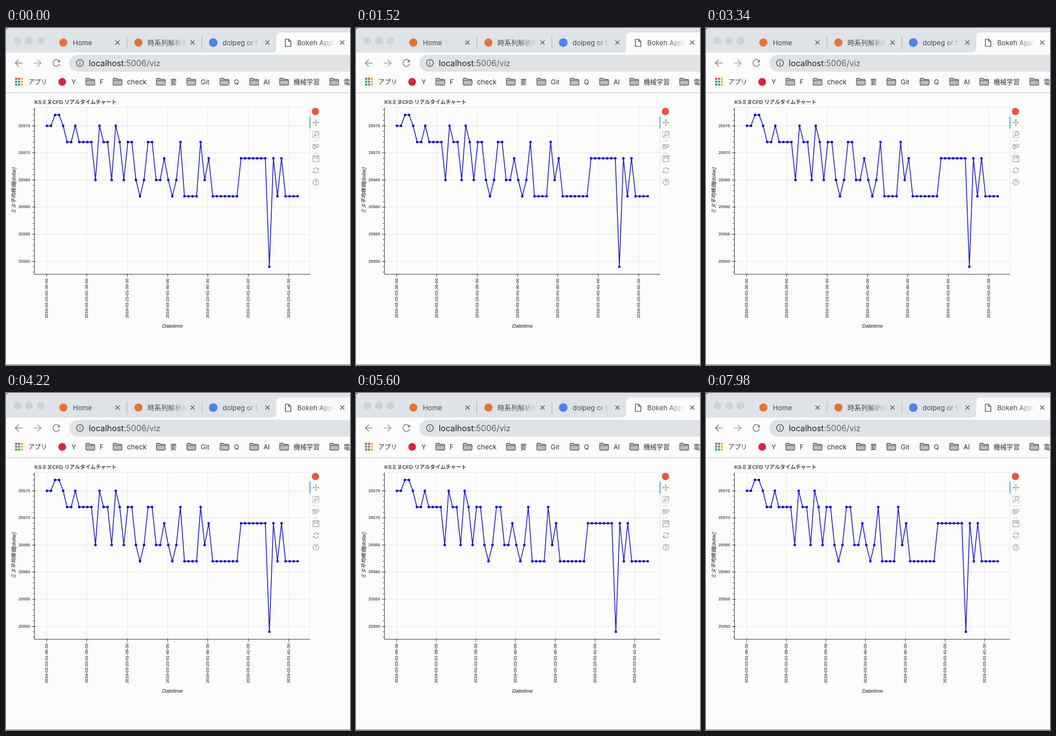
An HTML page for the animation above (8000 ms loop, 756x741 px).

```html
<!DOCTYPE html>
<html lang="ja">
<head>
<meta charset="utf-8">
<title>Live chart</title>
<style>
  html, body { margin: 0; height: 100%; overflow: hidden; background: #fcfcfc; }
  svg { display: block; width: 756px; height: 741px; }
  .ui { font: 15px Inter, "Noto Sans CJK JP", sans-serif; fill: #45494d; }
  .mark { font-size: 14.3px; fill: #2d3033; }
  .url { font-size: 18px; fill: #5f6368; }
  .plot { font: 9.2px "Liberation Sans", "Noto Sans CJK JP", sans-serif; fill: #333; }
  .plot text { stroke: #333; stroke-width: .15; }
  .plot .title { font-size: 11.5px; font-weight: bold; fill: #444; stroke: none; }
  .plot .axis { font-size: 11.4px; font-style: italic; }
  .line { fill: none; stroke: #1c1cdc; stroke-width: 1.8; stroke-linejoin: round; }
  .dot { fill: #0000f0; }
  .grid { stroke: #e4e4e8; fill: none; }
  .tick { stroke: #222; fill: none; }
  .icon { fill: none; stroke: #55595d; stroke-width: 1.7; }
  .tool { fill: none; stroke: #a1a6a9; stroke-width: 1.4; }
  .before { animation: hide 8s step-end infinite; }
  .after { animation: show 8s step-end infinite; }
  @keyframes hide { 0% { visibility: visible } 55%, 100% { visibility: hidden } }
  @keyframes show { 0% { visibility: hidden } 55%, 100% { visibility: visible } }
</style>
</head>
<body>
<svg id="stage" viewBox="0 0 756 741">
  <defs>
    <linearGradient id="fade2" gradientUnits="userSpaceOnUse" x1="355" x2="393"><stop stop-color="#45494d"/><stop offset="1" stop-color="#45494d" stop-opacity="0.15"/></linearGradient>
    <linearGradient id="fade3" gradientUnits="userSpaceOnUse" x1="525" x2="560"><stop stop-color="#45494d"/><stop offset="1" stop-color="#45494d" stop-opacity="0"/></linearGradient>
    <linearGradient id="fade4" gradientUnits="userSpaceOnUse" x1="685" x2="725"><stop stop-color="#45494d"/><stop offset="1" stop-color="#45494d" stop-opacity="0"/></linearGradient>
  </defs>

  <rect width="756" height="54" fill="#dee3e7"/>
  <path d="M0 0H5Q1 1 0 5Z" fill="#805a5c"/>
  <path d="M584 54Q594 54 594 44V20Q594 10 604 10H756V54Z" fill="#fcfcfc"/>
  <g fill="#d1d3d4" stroke="#c2c4c5">
    <circle cx="25" cy="28" r="7.5"/><circle cx="50.500" cy="28" r="7.5"/><circle cx="76" cy="28" r="7.5"/>
  </g>
  <path d="M265.500 19V46M430.500 19V46" stroke="#a3a7ab"/>
  <circle cx="126" cy="32" r="9" fill="#e8722e"/>
  <circle cx="291" cy="32" r="9" fill="#e8722e"/>
  <circle cx="455.500" cy="32" r="9.500" fill="#4a85ec"/>
  <path class="icon" d="M614 24.500H621L626 29.500V40.500H614ZM621 24.500V29.500H626"/>
  <g class="ui">
    <text x="147" y="37.500">Home</text>
    <text x="311" y="37.500" fill="url(#fade2)">時系列解析6</text>
    <text x="476" y="37.500" fill="url(#fade3)">dolpeg or t</text>
    <text x="640" y="37.500" fill="url(#fade4)">Bokeh Appl</text>
  </g>

  <g class="icon" stroke-width="2">
    <path d="M36.500 77H21M28 69.500L20.500 77L28 84.500" stroke="#7b7f83"/>
    <path d="M61 77H76.500M69.500 69.500L77 77L69.500 84.500" stroke="#9a9da0"/>
    <path d="M116.500 72A7.500 7.500 0 1 0 118 79" stroke="#7b7f83"/>
    <path d="M118.500 69V75.500H112Z" fill="#7b7f83" stroke="none"/>
  </g>
  <rect x="139" y="59" width="640" height="37" rx="18.500" fill="#dfe3e6"/>
  <circle class="icon" cx="162.500" cy="77" r="7.500"/>
  <path class="icon" d="M162.500 76V81.500M162.500 72.500V74.300"/>
  <g class="ui"><text class="url" x="182" y="83.500"><tspan fill="#202326">localhost</tspan>:5006/viz</text></g>

  <circle cx="123.500" cy="118.500" r="8.500" fill="#df2040"/>
  <path d="M0 142.500H756" stroke="#b4b4b6"/>
  <path d="M0 740.500H756" stroke="#6c6c6c"/>
  <g id="chrome"></g>
  <g id="chart" class="plot"></g>

  <circle cx="680" cy="183.500" r="8" fill="#e8573c"/>
  <path d="M668 195V221" stroke="#26a5d8" stroke-width="1.800"/>
  <g class="tool">
    <path d="M674.500 208H687.500M681 201.500V214.500M676.500 206L674.500 208L676.500 210M685.500 206L687.500 208L685.500 210M679 203.500L681 201.500L683 203.500M679 212.500L681 214.500L683 212.500"/>
    <path d="M674 227H688V241H674Z" stroke-dasharray="1.5 1.5"/>
    <circle cx="683" cy="232" r="4"/><path d="M680 235L676 239" stroke-width="2"/>
    <path d="M675 248H685M675 275H685" stroke="#c4c4c4" stroke-width="1"/>
    <rect x="674.500" y="256" width="5" height="9.500" rx="2.500"/><path d="M677 256V260"/>
    <circle cx="684.500" cy="259" r="3"/><path d="M683 262L681 265.500"/>
    <path d="M674.500 281H687.500V294H674.500ZM678 281V286H685V281M682.500 281V284"/>
    <path d="M675.500 312A5.600 5.600 0 0 1 685.500 309.500M686.500 314A5.600 5.600 0 0 1 676.500 316.500"/>
    <path d="M687.500 307V311.500H683ZM674.500 319V314.500H679Z" fill="#a1a6a9" stroke="none"/>
    <circle cx="681" cy="339" r="6.500"/>
    <path d="M679 337.500Q679 335.500 681 335.500T683 337.500Q683 338.700 681 339.800V340.700M681 341.700V343"/>
  </g>
</svg>
<script>
  const el = id => document.getElementById(id);
  const range = (n, f) => Array.from({ length: n }, (_, i) => f(i)).join('');
  const path = (cls, d) => `<path class="${cls}" d="${d}"/>`;

  // Browser buttons and bookmarks
  const close = x => path('icon', `M${x - 4.5} 27.5l9 9m0 -9l-9 9`);
  const folder = ([x, name]) =>
    `<path d="M${x + .5} 112.500q0 -2 2 -2h5l2 2.500h8.500q2 0 2 2v8.500q0 2 -2 2h-15.500q-2 0 -2 -2z" fill="#bcbcbc" stroke="#515151" stroke-width="1.300"/>` +
    `<path d="M${x + 1} 115.500h18.500" stroke="#515151"/>` +
    `<text class="mark" x="${x + 31}" y="123.500"${name === 'check' ? ' style="font-size:15px"' : ''}>${name}</text>`;
  const folders = [[175, 'F'], [235, 'check'], [330, '要'], [397, 'Git'], [470, 'Q'],
    [535, 'AI'], [601, '機械学習'], [711, '電']];
  const appColors = ['#e04a3f', '#e04a3f', '#efb52c', '#35a853', '#4285f4', '#efb52c', '#35a853', '#35a853', '#efb52c'];
  el('chrome').innerHTML = [245, 410, 574.5, 739].map(close).join('') +
    range(9, i => `<rect x="${20 + i % 3 * 6.3}" y="${109.5 + Math.floor(i / 3) * 6.3}" width="4.500" height="4.500" fill="${appColors[i]}"/>`) +
    `<g class="ui"><text class="mark" style="font-size:13.7px" x="49" y="123">アプリ</text><text class="mark" x="144" y="123.500">Y</text>${folders.map(folder).join('')}</g>`;

  // Prices above 25500
  const prices = [75, 75, 77, 77, 75, 72, 72, 75, 72, 72, 72, 72, 65, 75, 72, 72, 65, 75, 72, 65,
    72, 72, 65, 62, 65, 72, 72, 65, 65, 69, 65, 62, 65, 72, 62, 62, 62, 62, 72, 65, 69,
    ...Array(7).fill(62), ...Array(7).fill(69), 49, 69, 62, 69, 62, 62, 62, 62];
  const LEFT = 62.5, RIGHT = 668, TOP = 175, BOTTOM = 541.5;
  const priceY = v => 215 + (75 - v) * 11.92;
  const pad = n => String(n).padStart(2, '0');

  function timeTick(i, gap) {
    const x = Math.round(88.5 + i * gap) + .5, seconds = 38 * 60 + 30 + i * 30;
    const label = `2019-03-23-01-${pad(Math.floor(seconds / 60))}-${pad(seconds % 60)}`;
    return path('grid', `M${x} ${TOP}V${BOTTOM}`) + path('tick', `M${x} 540V547`) +
      `<text text-anchor="end" transform="translate(${x + 2.8} 551) rotate(-90)">${label}</text>`;
  }

  function series(cls, values, gap) {
    const points = values.map((v, i) => [90 + i * 551 / (values.length - 1), priceY(v)]);
    return { grid: `<g class="${cls}">${range(7, i => timeTick(i, gap))}</g>`,
      data: `<g class="${cls}">${path('line', 'M' + points.join('L'))}` +
        points.map(([x, y]) => `<circle class="dot" cx="${x}" cy="${y}" r="2.700"/>`).join('') + '</g>' };
  }

  const before = series('before', prices, 88.7);
  const after = series('after', [...prices, 62], 87.3);
  const priceTicks = range(6, i => {
    const v = 75 - i * 5, y = Math.round(priceY(v) - .5) + .5;
    return path('grid', `M${LEFT} ${y}H${RIGHT}`) + path('tick', `M57.500 ${y}H65`) +
      `<text x="53" y="${y + 2.8}" text-anchor="end">255${v}</text>`;
  });
  const minorTicks = range(31, i => path('tick', `M59 ${priceY(48 + i)}H${LEFT}`));

  el('chart').innerHTML = before.grid + after.grid + priceTicks + minorTicks +
    path('grid', `M${LEFT} ${TOP - .5}H${RIGHT}V${BOTTOM}`) +
    path('tick', `M${LEFT} ${TOP}V${BOTTOM}H${RIGHT}`) + before.data + after.data +
    '<text class="title" x="62.500" y="167">KSミヌCFD リアルタイムチャート</text>' +
    '<text class="axis" x="366" y="658.500" text-anchor="middle">Datetime</text>' +
    '<text class="axis" text-anchor="middle" transform="translate(20.500 357.500) rotate(-90)">ミヌ平均株価[dollar]</text>';
</script>
</body>
</html>
```
